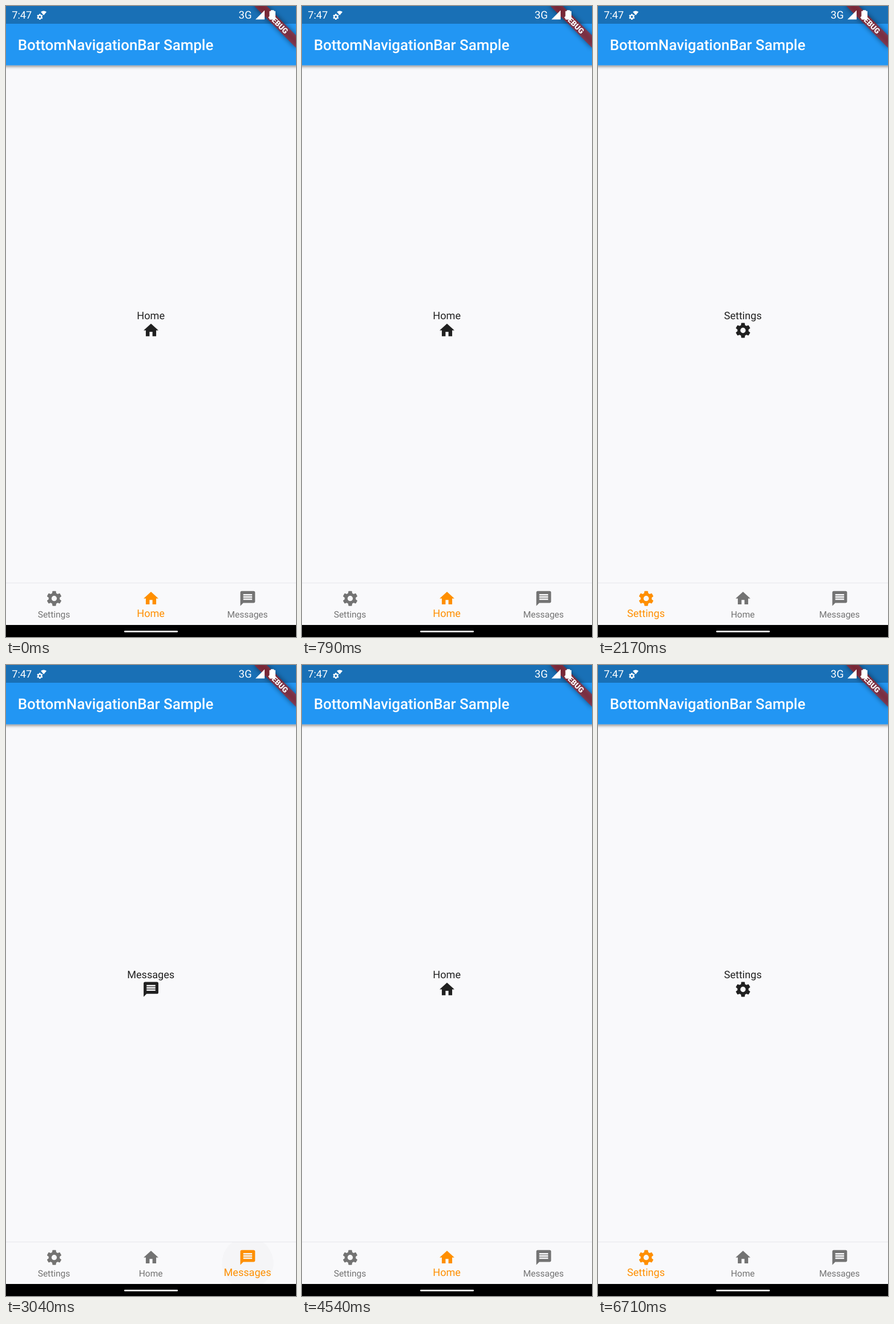
Recreate the animation shown at these times as an HTML page. Size 508 px wide and 1102 px high, loop 6.75 s.

```html
<!DOCTYPE html>
<html lang="en">
<head>
<meta charset="utf-8">
<title>BottomNavigationBar Sample</title>
<style>
  html, body { margin: 0; width: 100%; height: 100%; overflow: hidden; background: #f9f9fb; }
  svg { display: block; width: 100vw; height: 100vh; }
  text { font-family: Roboto, "Noto Sans", sans-serif; font-size: 18.1px; text-rendering: geometricPrecision; }
</style>
</head>
<body>
<svg id="stage" viewBox="0 0 508 1102" xmlns="http://www.w3.org/2000/svg">
  <defs>
    <filter id="barShadow" x="-5%" y="-20%" width="110%" height="150%">
      <feDropShadow dx="0" dy="2.5" stdDeviation="2.6" flood-color="#000" flood-opacity=".42"/>
    </filter>
    <filter id="soft" x="-30%" y="-150%" width="160%" height="400%">
      <feGaussianBlur stdDeviation="5"/>
    </filter>
    <clipPath id="navClip"><rect y="1008" width="508" height="73"/></clipPath>
  </defs>

  <rect width="508" height="1102" fill="#f9f9fb"/>
  <g id="page" fill="#202020"></g>

  <rect x="-20" y="-20" width="548" height="123.5" fill="#2196f3" filter="url(#barShadow)"/>
  <rect width="508" height="31" fill="#1970b6"/>
  <text x="20.7" y="77" fill="#fff" style="font-size:25.85px;font-weight:500">BottomNavigationBar Sample</text>

  <g transform="translate(508 0) rotate(45)">
    <rect x="-51.7" y="36.2" width="103.4" height="15.5" fill="#000" fill-opacity=".5" filter="url(#soft)"/>
    <rect x="-51.7" y="36.2" width="103.4" height="15.5" fill="#b71c1c" fill-opacity=".627"/>
    <text y="48.6" fill="#fff" text-anchor="middle" style="font-size:13.2px;font-weight:900">DEBUG</text>
  </g>

  <g fill="#fff">
    <text x="10.3" y="22.3">7:47</text>
    <path id="statusGear" fill-rule="evenodd" transform="translate(59.3 18.9) scale(.52)"/>
    <path d="M61 10.2Q66 6.6 71 10.2L66 16.2Z"/>
    <text x="407.5" y="22.2" style="font-size:18.5px">3G</text>
    <path d="M437 23.5H453V7.5Z"/>
    <path d="M464 8.8V7.3H469.3V8.8H471Q472 8.8 472 9.8V22.8Q472 23.8 471 23.8H462.4Q461.4 23.8 461.4 22.8V9.8Q461.4 8.8 462.4 8.8Z"/>
  </g>

  <rect y="1007" width="508" height="1.2" fill="#e9e9ed"/>
  <g id="ripples" clip-path="url(#navClip)"></g>
  <g id="nav"></g>
  <rect y="1081" width="508" height="21" fill="#000"/>
  <rect x="207" y="1091" width="94" height="2.8" rx="1.4" fill="#fff"/>
</svg>
<script>
const LOOP = 6750, UNIT = 1.2936, RADIUS = 45.2;
const SHIFT = 200, PRESS = 90, FADE = 200;
const GREY = [115, 115, 115], AMBER = [255, 143, 0];

// Item chosen at each tap; the first one is already settled at the start.
const taps = [
  { at: -1000, item: 1 },
  { at: 1600, item: 0 },
  { at: 2860, item: 2 },
  { at: 4020, item: 1 },
  { at: 5300, item: 0 }
];

// Icon paths are centred on the origin in a 24-unit box.
function gearPath() {
  const tooth = [[-2.76, -7.05], [-2.4, -9.59], [-1.92, -10], [1.92, -10], [2.4, -9.59], [2.76, -7.05]];
  const points = [];
  for (let k = 0; k < 6; k++) {
    const c = Math.cos(k * Math.PI / 3), s = Math.sin(k * Math.PI / 3);
    for (const [x, y] of tooth) points.push((x * c - y * s).toFixed(2) + " " + (x * s + y * c).toFixed(2));
  }
  return "M" + points.join("L") + "ZM-3.6 0a3.6 3.6 0 1 0 7.2 0a3.6 3.6 0 1 0-7.2 0Z";
}

const gear = gearPath();
const house = "M-2 8V2H2V8H7V0H10L0-9-10 0H-7V8Z";
const bubble = "M8-10H-8Q-10-10-10-8V10L-6 6H8Q10 6 10 4V-8Q10-10 8-10Z" +
  [-6, -3, 0].map(y => `M-6 ${y}H6v2H-6Z`).join("");

const items = [
  { label: "Settings", icon: gear, x: 84.4 },
  { label: "Home", icon: house, x: 254 },
  { label: "Messages", icon: bubble, x: 423.4 }
];

const byId = id => document.getElementById(id);

function add(parent, tag, attrs, text) {
  const el = document.createElementNS("http://www.w3.org/2000/svg", tag);
  for (const name in attrs) el.setAttribute(name, attrs[name]);
  if (text) el.textContent = text;
  return parent.appendChild(el);
}

function addIcon(parent, d, x, y) {
  add(parent, "path", { d, "fill-rule": "evenodd", transform: `translate(${x} ${y}) scale(${UNIT})` });
}

byId("statusGear").setAttribute("d", gear);

for (const item of items) {
  item.page = add(byId("page"), "g", {});
  add(item.page, "text", { x: 253.7, y: 547, "text-anchor": "middle" }, item.label);
  addIcon(item.page, item.icon, 254, 566.5);

  item.glow = add(byId("ripples"), "circle", { cx: item.x, cy: 1044.5, r: RADIUS, fill: "#bcbcbc" });
  item.splash = add(byId("ripples"), "circle", { cx: item.x, cy: 1044.5, fill: "#c8c8c8" });

  item.tab = add(byId("nav"), "g", {});
  addIcon(item.tab, item.icon, item.x, 1034.7);
  item.text = add(item.tab, "text", { y: -4.4, "text-anchor": "middle" }, item.label);
}

const clamp = v => Math.min(1, Math.max(0, v));

// Cubic Bézier (.4, 0, .2, 1)
function ease(x) {
  if (x <= 0 || x >= 1) return clamp(x);
  let lo = 0, hi = 1;
  for (let i = 0; i < 24; i++) {
    const u = (lo + hi) / 2, v = 1 - u;
    if (1.2 * v * v * u + .6 * v * u * u + u * u * u < x) lo = u; else hi = u;
  }
  return lo * lo * (3 - 2 * lo);
}

function selection(index, last, t) {
  const p = ease((t - taps[last].at) / SHIFT);
  if (taps[last].item === index) return p;
  return last > 0 && taps[last - 1].item === index ? 1 - p : 0;
}

function ripple(index, t) {
  const tap = taps.find(k => k.item === index && t >= k.at - PRESS && t < k.at + FADE);
  if (!tap) return { glow: 0, splash: 0, r: 0 };
  const held = t - tap.at + PRESS;
  const fade = 1 - clamp((t - tap.at) / FADE);
  const r = t < tap.at ? RADIUS * held / 1000
    : RADIUS * (.09 + .91 * clamp((t - tap.at) / 35));
  return { glow: .4 * Math.min(held / 200, fade), splash: .4 * fade, r };
}

function draw(t) {
  let last = 0;
  taps.forEach((tap, i) => { if (t >= tap.at) last = i; });
  items.forEach((item, i) => {
    item.page.setAttribute("visibility", taps[last].item === i ? "visible" : "hidden");
    const p = selection(i, last, t);
    const rgb = GREY.map((c, k) => Math.round(c + (AMBER[k] - c) * p));
    item.tab.setAttribute("fill", `rgb(${rgb})`);
    item.text.setAttribute("transform", `translate(${item.x - .4} 1071.6) scale(${(12 + 2 * p) / 14})`);
    const wave = ripple(i, t);
    item.glow.setAttribute("opacity", wave.glow);
    item.splash.setAttribute("opacity", wave.splash);
    item.splash.setAttribute("r", wave.r);
  });
}

const start = performance.now();
function tick() {
  draw((performance.now() - start) % LOOP);
  requestAnimationFrame(tick);
}
tick();
</script>
</body>
</html>
```
